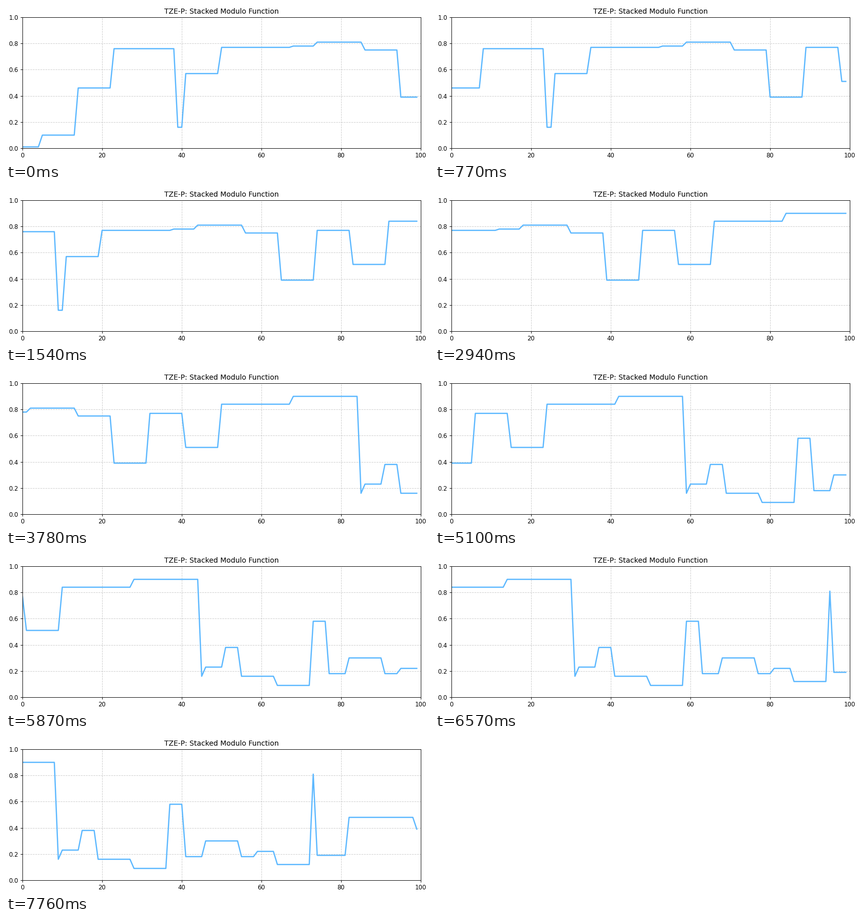
Recreate the animation shown at these times as a matplotlib script. Size 823x303 px, loop 7.83 s.

```python
import matplotlib.pyplot as plt
import numpy as np
from matplotlib.animation import FuncAnimation

W, H = 823, 303
DPI = 72  # one point equals one pixel
INTERVAL = 30
FRAMES = 261
STEPS = 112  # scroll steps in one loop
WINDOW = 100
BEAT = 9  # samples between reseeds
S = 1.16  # size of the default text and line styles


def share(a, n, b):
    """A beat that holds a for n samples, then b."""
    return n * [a] + (BEAT - n) * [b]


def build_signal():
    # One level in percent per beat, or several that share the beat
    beats = [1, 10, 46, 76, share(76, 7, 16), 57, 77, 77, [78, 78, 81], 81,
             75, 39, 77, 51, 84, 84, 90, share(90, 8, 16), [23, 38], 16,
             9, share(58, 4, 18), 30, share(18, 4, 22), 12,
             share(81, 1, 19), 48, share(48, 8, 39)]
    samples = []
    for beat in beats:
        parts = np.atleast_1d(beat)
        samples.extend(parts[np.arange(BEAT) * len(parts) // BEAT] / 100)
    return samples[BEAT // 2:]  # starts halfway through a beat


signal = build_signal()

tick = {"major.size": 3.5, "major.width": 0.8, "major.pad": 3.5, "labelsize": 10}
plt.rcParams.update({f"{a}tick.{k}": v * S for a in "xy" for k, v in tick.items()})
plt.rcParams.update({"font.family": "DejaVu Sans", "axes.linewidth": 0.8 * S})

fig = plt.figure(figsize=(W / DPI, H / DPI), dpi=DPI, facecolor="white")
ax = fig.add_axes([32 / W, 25 / H, 775 / W, 256 / H])
ax.set_xlim(0, WINDOW)
ax.set_ylim(0, 1)
ax.set_title("TZE-P: Stacked Modulo Function", fontsize=12 * S, pad=6 * S)
ax.grid(True, linestyle="--", linewidth=0.8 * S, color="#b0b0b0", alpha=0.65)
line, = ax.plot([], [], color="#5cb8ff", linewidth=2.1 * S)


def update(i):
    # Scrolls four samples every three steps, rounded up
    step = ((i + 1) * STEPS - 1) // FRAMES
    start = (4 * step + 2) // 3
    line.set_data(np.arange(WINDOW), signal[start:start + WINDOW])
    return line,


anim = FuncAnimation(fig, update, frames=FRAMES, init_func=lambda: update(0),
                     interval=INTERVAL, repeat=True, repeat_delay=0)
plt.show()
```
